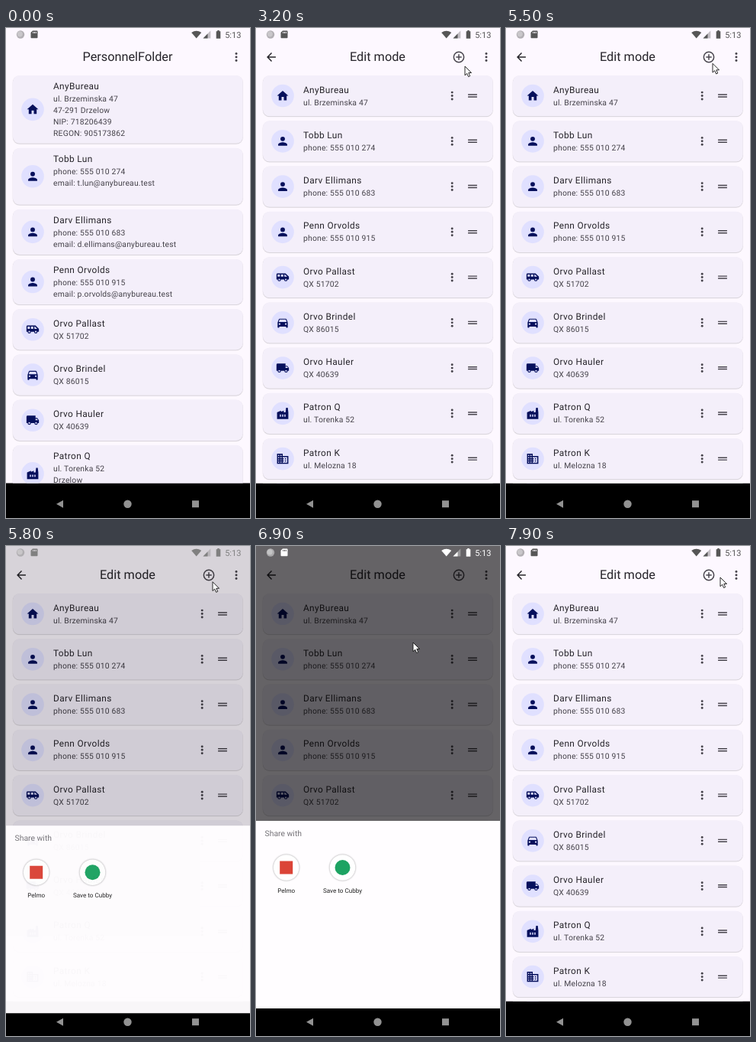
Write an HTML page that moves like this. It is 320 px wide and 640 px high and loops after 8 s.

```html
<!DOCTYPE html>
<html lang="en">
<head>
<meta charset="utf-8">
<title>Personnel folder</title>
<style>
html, body { margin: 0; width: 100%; height: 100%; overflow: hidden; background: #000; }
svg { display: block; width: 320px; height: 640px; font-family: Roboto, 'Open Sans', sans-serif; }
text { white-space: pre; text-rendering: geometricPrecision; }
.menu { filter: drop-shadow(0 .8px 1.2px rgba(0,0,0,.3)); }
.badge { filter: drop-shadow(0 .6px .8px rgba(0,0,0,.4)); }
</style>
</head>
<body>
<svg id="stage" viewBox="0 0 320 640"></svg>
<script>
const LOOP = 8000, STEP = 100, DP = 320 / 432, FLOOR = 594.4;
const BG = '#fdf8ff', NAVY = '#06105c', AVATAR = '#e0e0ff', INK = '#26242a', GREY = '#47444c';

// Icons on a 24 unit grid
const shape = d => `<path fill-rule="evenodd" d="${d}"/>`;
const wheel = (x, y) => `<circle cx="${x}" cy="${y}" r="2.25" fill="${AVATAR}" stroke="${NAVY}" stroke-width="1.5"/>`;
const box = (x, y, w = 2, h = w) => `M${x} ${y}h${w}v${h}h${-w}z`;
const dot = (x, y, r) => `<circle cx="${x}" cy="${y}" r="${r}"/>`;
const ICONS = {
  home: shape('M10 20v-6h4v6h5v-8h3L12 3 2 12h3v8z'),
  person: dot(12, 8, 4) + shape('M12 14c-2.7 0-8 1.3-8 4v2h16v-2c0-2.7-5.3-4-8-4z'),
  van: shape('M17 5H3q-2 0-2 2v9h22v-5z' + box(3, 7, 4) + box(9, 7, 4) + 'M15 7h1l4 4h-5z') + wheel(6, 16) + wheel(17.5, 16),
  car: shape('M18.9 6q-.4-1-1.4-1h-11q-1 0-1.4 1L3 12v8q0 1 1 1h1q1 0 1-1v-1h12v1q0 1 1 1h1q1 0 1-1v-8zM5 11l1.5-4.5h11L19 11z') +
    `<g fill="${AVATAR}">${dot(6.5, 14.5, 1.5)}${dot(17.5, 14.5, 1.5)}</g>`,
  truck: shape('M20 8h-3V4H3q-2 0-2 2v11h22v-5zM19.5 9.5l2 2.5H17V9.5z') + wheel(6, 17) + wheel(18, 17),
  factory: shape('M22 22H2V10l7-3v2l5-2v3h3l1-8h3l1 8z' + [7, 11, 15].map(x => box(x, 14, 2, 4)).join('')),
  office: shape('M12 7V3H2v18h20V7z' + [4, 8].map(x => [5, 9, 13, 17].map(y => box(x, y)).join('')).join('') +
    'M20 19h-8v-2h2v-2h-2v-2h2v-2h-2V9h8z') + shape(box(16, 11) + box(16, 15)),
  more: dot(12, 6, 2) + dot(12, 12, 2) + dot(12, 18, 2),
  drag: shape(box(4, 9, 16, 2) + box(4, 13, 16, 2)),
  back: shape('M20 11H7.8l5.6-5.6L12 4l-8 8 8 8 1.4-1.4L7.8 13H20z'),
  add: '<circle cx="12" cy="12" r="9" fill="none" stroke="currentColor" stroke-width="2"/>' +
    shape(box(11, 7, 2, 10)) + shape(box(7, 11, 10, 2)),
  pencil: shape('M3 17.2V21h3.8L17.8 9.9 14 6.2zM20.7 7q.6-.7 0-1.4l-2.3-2.3q-.7-.6-1.4 0l-1.9 1.8 3.8 3.8z'),
  gear: '<g fill="none" stroke="currentColor"><circle cx="12" cy="12" r="5.4" stroke-width="3.8"/>' +
    '<circle cx="12" cy="12" r="8.4" stroke-width="3" stroke-dasharray="4.4 4.4" stroke-dashoffset="-2.2"/></g>',
  share: dot(18, 5, 3) + dot(6, 12, 3) + dot(18, 19, 3) +
    '<path d="M18 5 6 12l12 7" fill="none" stroke="currentColor" stroke-width="2"/>',
  down: shape('M19 9h-4V3H9v6H5l7 7z' + box(5, 18, 14, 2)),
  up: shape('M9 16h6v-6h4l-7-7-7 7h4z' + box(5, 18, 14, 2))
};
const icon = (name, x, y, color) =>
  `<g transform="translate(${x} ${y}) scale(${DP}) translate(-12 -12)" fill="${color}" color="${color}">${ICONS[name]}</g>`;
const text = (s, x, y, size, color, more = '') =>
  `<text x="${x}" y="${y}" font-size="${size}" fill="${color}" ${more}>${s}</text>`;
const rect = (x, y, w, h, fill, more = '') =>
  `<rect x="${x}" y="${y}" width="${w}" height="${h}" fill="${fill}" ${more}/>`;

const MAIL = '@anybureau.test';
const ENTRIES = [
  ['home', 'AnyBureau', 'ul. Brzeminska 47', '47-291 Drzelow', 'NIP: 718206439', 'REGON: 905173862'],
  ['person', 'Tobb Lun', 'phone: 555 010 274', 'email: t.lun' + MAIL, ''],
  ['person', 'Darv Ellimans', 'phone: 555 010 683', 'email: d.ellimans' + MAIL],
  ['person', 'Penn Orvolds', 'phone: 555 010 915', 'email: p.orvolds' + MAIL],
  ['van', 'Orvo Pallast', 'QX 51702'],
  ['car', 'Orvo Brindel', 'QX 86015'],
  ['truck', 'Orvo Hauler', 'QX 40639'],
  ['factory', 'Patron Q', 'ul. Torenka 52', 'Drzelow', ''],
  ['office', 'Patron K', 'ul. Melozna 18']
];

function card([kind, title, ...lines], y, h, editing) {
  const pad = (h - (24 + 20 * lines.length) * DP) / 2, top = y + pad, mid = y + h / 2;
  const round = 'rx="8.9"';
  return rect(8.5, y + .2, 302.6, h + 1, '#000', round + ' opacity=".05"') +
    rect(8.9, y + .8, 301.8, h, '#000', round + ' opacity=".12"') +
    rect(8.9, y, 301.8, h, '#f4effa', round) +
    `<circle cx="35" cy="${mid}" r="14.8" fill="${AVATAR}"/>` + icon(kind, 35, mid, NAVY) +
    text(title, 62, top + 12.3, 16 * DP, INK, 'letter-spacing=".37"') +
    lines.map((s, i) => text(s, 62, top + 28.4 + i * 20 * DP, 14 * DP, '#45424a', 'letter-spacing=".185"')).join('') +
    (editing ? icon('more', 257.2, mid, GREY) + icon('drag', 284, mid, GREY) : '');
}

function page(title, editing) {
  let y = 61.9, out = rect(0, 0, 320, 595, BG);
  for (const entry of ENTRIES) {
    if (y > FLOOR) break;
    const e = editing ? entry.slice(0, 3) : entry;
    const h = Math.max(72, 24 + 20 * (e.length - 2) + 16) * DP;
    out += card(e, y, h, editing);
    y += h + 8 * DP;
  }
  return out + text(title, 159.5, 43.4, 22 * DP, INK, 'text-anchor="middle"') +
    icon('more', 302, 38, GREY) +
    (editing ? icon('back', 20, 38, INK) + icon('add', 266, 38, GREY) : '');
}

const MENU = { x: 189, y: 24, w: 124.8 };
const menuHeight = n => (n * 48 + 16) * DP;
const menu = (id, items) =>
  `<clipPath id="${id}Clip"><rect id="${id}Cut"/></clipPath>
   <g id="${id}"><rect id="${id}Box" class="menu" rx="3" fill="#ede8f6"/><g clip-path="url(#${id}Clip)">` +
  items.map(([kind, label], i) => {
    const y = MENU.y + (8 + 48 * i + 24) * DP;
    return `<g id="${id}${i}">${icon(kind, 207, y, GREY)}${text(label, 231, y + 3.6, 14 * DP, INK, 'font-weight="500" letter-spacing=".07"')}</g>`;
  }).join('') + '</g></g>';

const app = (x, label, mark) =>
  `<circle class="badge" cx="${x}" cy="420" r="16.8" fill="#fff"/>${mark}` +
  text(label, x, 453, 8.1, '#222', 'text-anchor="middle"');

const stage = document.getElementById('stage');
stage.innerHTML = `
  <clipPath id="view"><rect width="320" height="${FLOOR}"/></clipPath>
  ${rect(0, 0, 320, 640, '#000')}
  <g clip-path="url(#view)">
    <g id="details">${page('PersonnelFolder', false)}</g>
    <g id="edit">${page('Edit mode', true)}</g>
    <circle id="press" cx="302" cy="38" r="14.8" fill="#49454f" opacity=".1"/>
    ${menu('first', [['pencil', 'Edit mode'], ['gear', 'Settings']])}
    ${menu('second', [['share', 'Share config'], ['down', 'Save config'], ['up', 'Load config'], ['gear', 'Settings']])}
  </g>
  ${rect(0, 0, 320, 640, '#000', 'id="dim"')}
  <g id="sheet">
    ${rect(0, 359, 320, 245, '#fffdff')}
    ${text('Share with', 11.5, 379, 10.4, '#757378')}
    ${app(39.7, 'Pelmo', rect(31.2, 411.5, 17, 17, '#db4437'))}
    ${app(113.5, 'Save to Cubby', '<circle cx="113.5" cy="420" r="10" fill="#1da362"/>')}
  </g>
  <g id="status">
    <circle cx="19" cy="8.5" r="5.2" opacity=".45"/><circle cx="18.2" cy="7.8" r="3.6" fill="#fff" opacity=".3"/>
    <path fill-rule="evenodd" d="M35 3.4h5.6q.9 0 .9.9v8q0 .9-.9.9h-7.2q-.9 0-.9-.9V6zM35.200 5h1v2h-1zM37 5h1v2h-1zM38.800 5h1v2h-1z"/>
    <path d="M243.200 6q6.500-4.600 13 0l-6.500 7.500z"/>
    <path d="M268.300 3.600v10h-9.800z" opacity=".35"/><path d="M264.500 7.500v6.100h-6z"/>
    <path d="M277.300 3h2.400v1.200h1.600v9.500h-5.600V4.200h1.600z"/>
    ${text('5:13', 287.2, 12.5, 11, 'inherit', 'style="fill:inherit"')}
  </g>
  <g fill="#929292">
    <path d="M66 621.7l9-5v10z"/><circle cx="159.5" cy="621.7" r="5.2"/>${rect(244, 617.2, 9, 9, '#929292')}
  </g>
  <path id="cursor" d="M0 0v11.8l2.7-2.5 1.900 4.300 2.100-.9-1.900-4.200h3.700z" fill="#fff" stroke="#111" stroke-width=".9" stroke-linejoin="round"/>`;

const $ = id => document.getElementById(id);
const clamp = v => Math.min(1, Math.max(0, v));
const ramp = (t, from, to) => clamp((t - from) / (to - from));
const set = (el, attrs) => { for (const k in attrs) el.setAttribute(k, attrs[k]); };
const show = (el, alpha) => set(el, { opacity: alpha, visibility: alpha > 0 ? 'visible' : 'hidden' });

// Pointer stops: time, x, y
const STOPS = [
  [1400, 315, 72], [1800, 302, 41], [2050, 302, 41], [2300, 274, 50], [3700, 274, 50], [4100, 302, 41],
  [4800, 302, 41], [5100, 271, 46], [6100, 271, 47], [6900, 206, 126], [7500, 205, 126], [7900, 281, 41]
];

function moveCursor(t) {
  const i = Math.max(0, STOPS.findLastIndex(s => s[0] <= t));
  const a = STOPS[i], b = STOPS[i + 1] || a;
  const p = b === a ? 0 : ramp(t, a[0], b[0]), e = p * p * (3 - 2 * p);
  set($('cursor'), {
    transform: `translate(${a[1] + (b[1] - a[1]) * e} ${a[2] + (b[2] - a[2]) * e})`,
    visibility: t < STOPS[0][0] ? 'hidden' : 'visible'
  });
}

// Fade, grow, then reveal the rows one after another
function drawMenu(id, n, t, open, close) {
  const v = t < close ? ramp(t, open, open + 300) : clamp(1.5 * (1 - (t - close) / 300));
  const unit = 1 / (n + 1.5), w = MENU.w * clamp(v / unit), h = menuHeight(n) * clamp(v / (unit * n));
  const frame = { x: MENU.x + MENU.w - w, y: MENU.y, width: w, height: h };
  set($(id + 'Box'), frame);
  set($(id + 'Cut'), frame);
  show($(id), clamp(v * 3));
  for (let i = 0; i < n; i++) set($(id + i), { opacity: clamp((v - (i + 1) * unit) / (1.5 * unit)) });
}

function draw(t) {
  moveCursor(t);

  const turn = ramp(t, 2450, 2750), zoom = 1 - .15 * (1 - turn) ** 3;
  show($('edit'), clamp(turn * 2));
  set($('edit'), { transform: `translate(160 297.5) scale(${zoom}) translate(-160 -297.5)` });

  const pressed = (t >= 1900 && t < 2500) || (t >= 4300 && t < 5300);
  set($('press'), { visibility: pressed ? 'visible' : 'hidden' });
  drawMenu('first', 2, t, 2000, 2400);
  drawMenu('second', 4, t, 4340, 5200);

  const rise = ramp(t, 5500, 5900), fall = ramp(t, 7350, 7505), shade = ramp(t, 5700, 6100);
  show($('dim'), .6 * (shade - ramp(t, 7350, 7600)));
  show($('sheet'), clamp(rise / .77) * (1 - fall));
  set($('sheet'), { transform: `translate(0 ${100 * (1 - rise) ** 2 + 45 * fall * fall})` });

  const tone = 86 + 169 * (shade - ramp(t, 7350, 7500));
  set($('status'), { fill: `rgb(${tone},${tone},${tone})` });
}

// Motion advances in steps of 100 ms
const start = performance.now();
function tick() {
  const t = (performance.now() - start + 8) % LOOP;
  draw(Math.floor(t / STEP) * STEP);
  requestAnimationFrame(tick);
}
tick();
</script>
</body>
</html>
```
